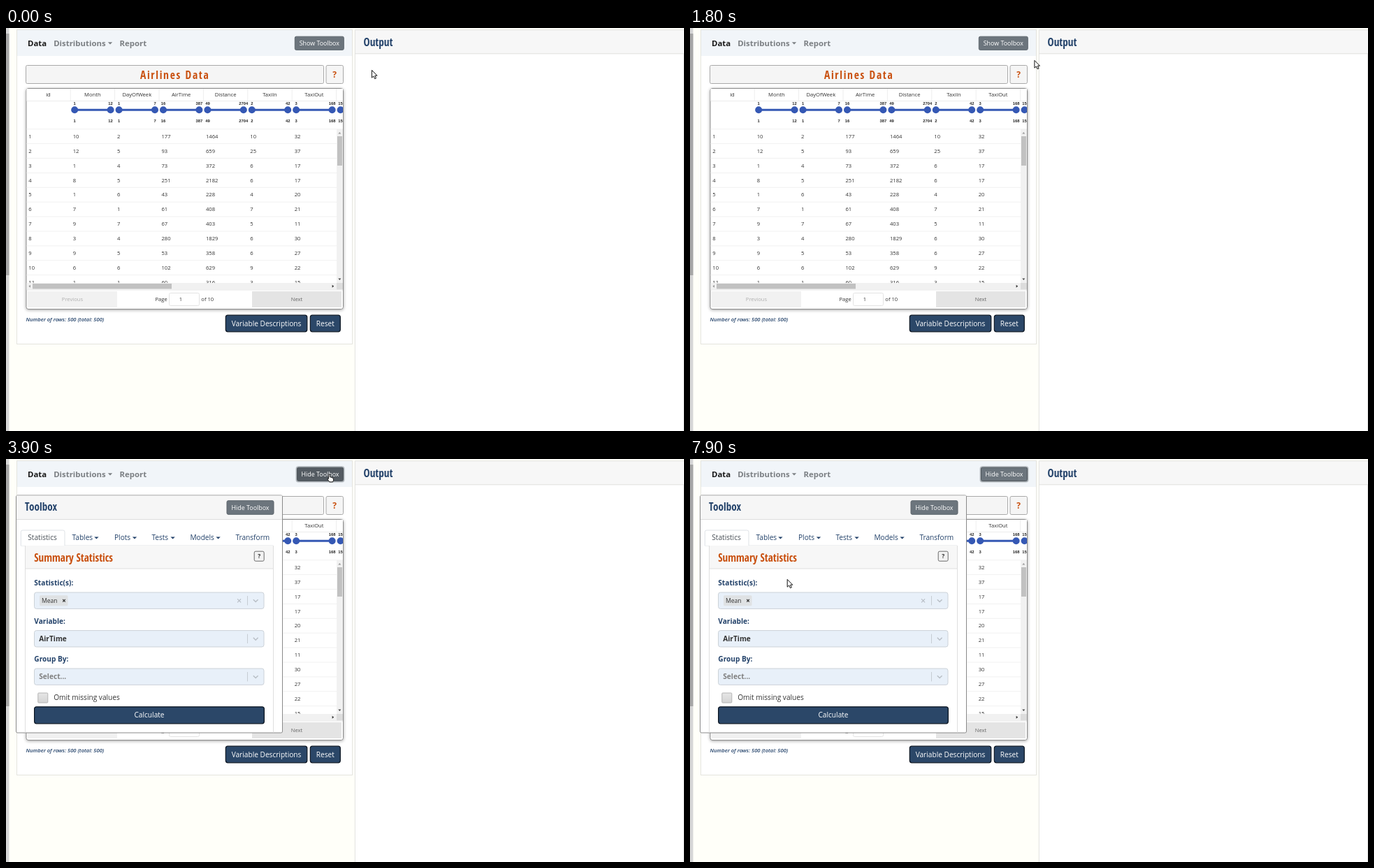
Recreate the animation shown at these times as an HTML page. Size 970 by 577 pixels, loop 8 s.

```html
<!DOCTYPE html>
<html lang="en">
<head>
<meta charset="utf-8">
<title>Airlines Data</title>
<style>
html, body { margin: 0; width: 100%; height: 100%; overflow: hidden; background: #fffff9; }
svg { display: block; width: 970px; height: 577px; }
text { font-family: "Open Sans", "Noto Sans", sans-serif; white-space: pre; }
.b { font-weight: 700; }
.cond { font-family: "Open Sans Condensed", "Open Sans", sans-serif; font-stretch: 75%; font-weight: 700; }
.tick { font-family: "Liberation Sans", sans-serif; font-weight: 700; }
.note { font-style: italic; font-weight: 600; }
</style>
</head>
<body>
<svg id="stage" viewBox="0 0 970 577"></svg>
<script>
const NAVY = '#23426a', ORANGE = '#c9500f', BLUE = '#3558b4', GREY = '#6c757d';
const START = 0, MID = 1, anchors = ['start', 'middle'];

const rect = (x, y, w, h, fill, stroke = 'none', r = 0, more = '') =>
  `<rect x="${x}" y="${y}" width="${w}" height="${h}" fill="${fill}" stroke="${stroke}" rx="${r}" ${more}/>`;
const text = (s, x, y, size, fill, cls = '', at = START, more = '') =>
  `<text x="${x}" y="${y}" font-size="${size}" fill="${fill}" class="${cls}" text-anchor="${anchors[at]}" ${more}>${s}</text>`;
const path = (d, fill, stroke = 'none', more = '') =>
  `<path d="${d}" fill="${fill}" stroke="${stroke}" ${more}/>`;
const line = (x1, y1, x2, y2, color, w = 1) =>
  path(`M${x1} ${y1}L${x2} ${y2}`, 'none', color, `stroke-width="${w}"`);
const caret = (x, y, color, w = 6.4) => path(`M${x} ${y}h${w}l${-w / 2} ${w / 2}z`, color);
const button = (x, y, w, h, label) =>
  rect(x, y, w, h, '#2b4768', '#0b1420', 3, 'stroke-width="1.2"') +
  text(label, x + w / 2, y + h / 2 + 3.6, 10.14, '#fff', '', MID);

const COL = 63.4, ROW = 20.9;
const columns = ['id', 'Month', 'DayOfWeek', 'AirTime', 'Distance', 'TaxiIn', 'TaxiOut'];
const ranges = [[1, 12], [1, 7], [16, 387], [49, 2704], [2, 42], [3, 168], [15, '']];
const rows = [
  '10 2 177 1464 10 32', '12 5 93 659 25 37', '1 4 73 372 6 17', '8 5 251 2182 6 17',
  '1 6 43 228 4 20', '7 1 61 408 7 21', '9 7 67 403 5 11', '3 4 280 1829 6 30',
  '9 5 53 358 6 27', '6 6 102 629 9 22', '1 1 60 316 3 15'
].map((r, i) => [i + 1, ...r.split(' ')]);

function slider([lo, hi], i) {
  const a = 98.2 + COL * i, b = a + 51.4;
  return line(a, 117.2, b, 117.2, BLUE, 3) +
    [a, b].map(x => `<circle cx="${x}" cy="117.2" r="5" fill="${BLUE}"/>`).join('') +
    [110, 134.8].map(y => text(lo, a, y, 5.8, '#222', 'tick', MID) + text(hi, b, y, 5.8, '#222', 'tick', MID)).join('');
}

function table() {
  const heads = columns.map((c, i) =>
    text(c, 60.5 + COL * i, 98.2, 7.65, '#333', '', MID) +
    line(92.2 + COL * i, 87, 92.2 + COL * i, 104, '#eee')).join('');
  const cells = rows.map((r, j) =>
    r.map((v, i) => text(v, 32.3 + COL * i, 157.8 + ROW * j, 7.65, '#333')).join('') +
    line(29, 165.6 + ROW * j, 473, 165.6 + ROW * j, '#f1f1f1')).join('');
  return rect(29, 86.5, 453.5, 316, '#fff', '#8c8c8c', 3, 'filter="url(#soft)"') +
    `<g clip-path="url(#grid)">${ranges.map(slider).join('')}${rect(29, 87, 454, 17, '#fff')}${heads}
     ${rect(29, 104, 454, 1, '#ececec')}${line(29, 144.8, 482, 144.8, '#f1f1f1')}${cells}</g>` +
    // scroll bars
    rect(473, 145, 9, 220, '#f1f1f1') + rect(474, 155, 7, 42, '#c1c1c1') +
    path('M475.3 151.5h4l-2-2.6z', '#999') + path('M475.3 358.5h4l-2 2.6z', '#444') +
    rect(29.5, 365, 443.5, 9.5, '#f1f1f1') + rect(38, 366, 199, 7.5, '#c1c1c1') + rect(473, 365, 9, 9.5, '#dcdcdc') +
    path('M35 367.7v4l-2.6-2z', '#999') + path('M466.6 367.7v4l2.6-2z', '#333') +
    // pager
    line(29.5, 375, 482, 375, '#e6e6e6') +
    rect(31, 377, 128, 23, '#f1f1f1') + text('Previous', 95, 391.3, 7.65, '#b0b0b0', '', MID) +
    rect(352, 377, 128, 23, '#e4e4e4') + text('Next', 416, 391.3, 7.65, '#666', '', MID) +
    text('Page', 213.5, 391.3, 7.65, '#333') + rect(233.5, 379.5, 43, 18, '#fff', '#e3e3e3', 2) +
    text('1', 250, 391.3, 7.65, '#333', '', MID) + text('of 10', 279.3, 391.3, 7.65, '#333');
}

const page = () =>
  rect(0, 0, 970, 577, '#fffff9') +
  rect(0, 0, 4.5, 577, '#d6d6d6') + rect(0, 8, 4.5, 346, '#a6a6a6') +
  rect(15.5, 2.5, 480, 450, '#fff', '#e4e4df') + rect(16, 3, 479, 37, '#f1f5f9') +
  text('Data', 31, 25.8, 11.4, '#1b1b1b', 'b') +
  text('Distributions', 68.2, 25.8, 11.4, '#7b7f83', 'b') + caret(145.8, 20.2, '#7b7f83') +
  text('Report', 162.6, 25.8, 11.4, '#7b7f83', 'b') +
  rect(28.5, 53.5, 426, 26, '#f5f5f5', '#a9a9a9', 2) +
  text('Airlines Data', 241.7, 72.6, 15.5, ORANGE, 'cond', MID, 'letter-spacing="1.7"') +
  rect(458, 53.5, 24.5, 26, '#f5f5f5', '#a9a9a9', 2) + text('?', 470.2, 71.2, 12, ORANGE, 'b', MID) +
  table() +
  text('Number of rows: 500 (total: 500)', 28.5, 420.4, 7.6, NAVY, 'note') +
  button(314.3, 411.2, 116.5, 23.6, 'Variable Descriptions') + button(435.3, 411.2, 43, 23.6, 'Reset') +
  rect(499, 3, 471, 574, '#fff') + rect(499, 3, 471, 34, '#f7f7f7') +
  path('M970 2.8H499.3V577M499 36.8H970M969.6 37V577', 'none', '#e2e2df') +
  text('Output', 511.6, 25.5, 15.2, NAVY, 'cond');

const select = y => rect(40.5, y, 328.5, 23.4, '#e8f0f9', '#ccd2d8', 3) +
  line(345.5, y + 5, 345.5, y + 18.4, '#c6ccd3') +
  path(`M353.8 ${y + 10.2}l3.4 3.4l3.4-3.4`, 'none', '#b8bec5', 'stroke-width="1.4"');
const cross = (x, y, r, color) =>
  path(`M${x - r} ${y - r}l${2 * r} ${2 * r}m0 ${-2 * r}l${-2 * r} ${2 * r}`, 'none', color, 'stroke-width="1.2"');
const menus = [['Tables', 94.5, 126.2], ['Plots', 155, 180.8], ['Tests', 208.4, 235.4], ['Models', 263.4, 300.4]];

const toolbox = () =>
  rect(14.5, 52, 381, 340, '#fff', '#8a8a8a', 2) + rect(15, 52.5, 380, 34, '#f6f6f6') +
  line(15, 86.5, 395, 86.5, '#dedede') + text('Toolbox', 27, 74.3, 15.2, NAVY, 'cond') +
  rect(316, 59.7, 67, 19.6, GREY, '#5c646b', 2) + text('Hide Toolbox', 349.5, 72.8, 8.9, '#fff', '', MID) +
  line(21, 124, 382, 124, '#dee2e6') +
  rect(27.5, 124, 355, 33, '#f7f7f7') + path('M27.5 391.5V124M382.5 124V391.5M27 157H383', 'none', '#dfdfdf') +
  path('M21.3 124V104.5q0-2.5 2.5-2.5H81.5q2.5 0 2.5 2.5V124', '#fff', '#dee2e6') +
  text('Statistics', 31.3, 116.4, 10.14, '#495057') +
  menus.map(([s, x, c]) => text(s, x, 116.4, 10.14, NAVY) + caret(c, 111.4, NAVY)).join('') +
  text('Transform', 328.4, 116.4, 10.14, NAVY) +
  text('Summary Statistics', 40.3, 146.6, 15.2, ORANGE, 'cond') +
  rect(355.2, 132.2, 14, 14, '#f2f2f2', '#6a6a6a', 2) + text('?', 362.2, 142.4, 8.4, '#333', 'b', MID) +
  text('Statistic(s):', 40.3, 181.4, 10.14, NAVY, 'b') + select(191) +
  rect(48, 195.2, 40.5, 15, '#dfe2e4', 'none', 1.5) + text('Mean', 51, 205.8, 8.6, '#333') +
  cross(83, 202.8, 1.8, '#333') + cross(333.6, 202.8, 2.5, '#b8bec5') +
  text('Variable:', 40.3, 236, 10.14, NAVY, 'b') + select(245.6) + text('AirTime', 47.3, 261, 10.14, '#333', 'b') +
  text('Group By:', 40.3, 290.4, 10.14, NAVY, 'b') + select(300) + text('Select...', 47.3, 315.4, 10.14, '#808080', 'b') +
  rect(45.8, 335, 14, 14, 'url(#box)', '#b4b4b4', 1) + text('Omit missing values', 68.2, 345.4, 10.14, '#333') +
  button(40.6, 354.8, 328.8, 24, 'Calculate');

// white repaint flash
const flash = () => rect(4.5, 198, 479.5, 379, '#fff') + rect(484, 215.5, 486, 361.5, '#fff') +
  path('M472 214.5L482.5 204V214.5z', '#e6e6e6');

const arrow = path('M.4 .4V11.2L2.9 8.9L4.6 12.7L6.5 11.9L4.8 8.2H8z', '#fff', '#111', 'stroke-linejoin="round"');
const hand = path('M-1.1 6V.9q0-1 1-1t1 1V3.6q1.8-.4 2.2.6q1.5-.2 1.7.9q1.2 0 1.2 1.2V8.2L5 10.6H.4L-2.6 6.8q-.2-1.3 1.5-.8z', '#fff', '#111');

stage.innerHTML = `<defs>
  <clipPath id="grid"><rect x="29.5" y="87" width="452.5" height="278"/></clipPath>
  <filter id="soft" x="-5%" y="-5%" width="110%" height="110%"><feDropShadow dx="0" dy="1" stdDeviation="2" flood-opacity=".35"/></filter>
  <linearGradient id="box" x2="0" y2="1"><stop stop-color="#e6e6e6"/><stop offset="1" stop-color="#d4d4d4"/></linearGradient>
</defs>
${page()}<g id="toggle"></g><g id="tools">${toolbox()}</g>
<g id="hover">${path('M84.6 124V104.5q0-2.5 2.5-2.5H141q2.5 0 2.5 2.5V124', 'none', '#e3e7ea')}</g>
<g id="blank">${flash()}</g><g id="cursor"><g id="arrow">${arrow}</g><g id="hand">${hand}</g></g>`;

// glide: time, x, y joined by straight moves; jumps: held until the next one
const glide = [[0, 523, 60], [500, 523, 60], [800, 521, 77], [1400, 508, 73], [1800, 492.5, 46], [2300, 461, 23], [2400, 462.5, 22.3]];
const jumps = [[2400, 462.5, 22.3], [4600, 387, 34], [4900, 289.5, 65], [5100, 264.5, 76], [5600, 217.8, 80.3],
  [5900, 139.5, 109], [6100, 124, 115], [6300, 122.5, 117.5], [7700, 128, 131], [7900, 138.8, 172]];

function pointer(t) {
  if (t >= 2400) return jumps.findLast(k => k[0] <= t).slice(1);
  const i = glide.findIndex(k => k[0] > t), [a, ax, ay] = glide[i - 1], [b, bx, by] = glide[i];
  const p = (t - a) / (b - a);
  return [ax + (bx - ax) * p, ay + (by - ay) * p];
}

function toggleButton(t, over) {
  const open = t >= 3900, focus = t >= 3700;
  const x = open ? 416.5 : 413.3, w = 899 - 2 * x - (open ? 0 : 2.4) + (open ? 0 : 0);
  const fill = over ? (focus ? '#545b62' : '#5a6268') : t >= 4600 && t < 4900 ? '#61696f' : GREY;
  return (focus ? rect(x - 1, 11.2, w + 2, 21.2, 'none', '#b2b8bd', 3, 'stroke-width="2"') : '') +
    rect(x, 12.2, w, 19.2, fill, focus ? '#4e555b' : '#5f676e', 2) +
    text(open ? 'Hide Toolbox' : 'Show Toolbox', x + w / 2, 25.1, 8.9, '#fff', '', MID);
}

const show = (el, on) => el.setAttribute('visibility', on ? 'visible' : 'hidden');
const get = id => document.getElementById(id);

function frame() {
  const t = Math.floor(performance.now() % 8000 / 100) * 100;
  const [x, y] = pointer(t);
  const over = x > 413 && x < 483 && y > 12 && y < 32;
  const onTab = t >= 6100 && t < 7700;
  get('toggle').innerHTML = toggleButton(t, over);
  get('cursor').setAttribute('transform', `translate(${x} ${y})`);
  show(get('arrow'), !over && !onTab);
  show(get('hand'), over || onTab);
  show(get('hover'), onTab);
  show(get('tools'), t >= 3900);
  show(get('blank'), t === 800);
  requestAnimationFrame(frame);
}
frame();
</script>
</body>
</html>
```
